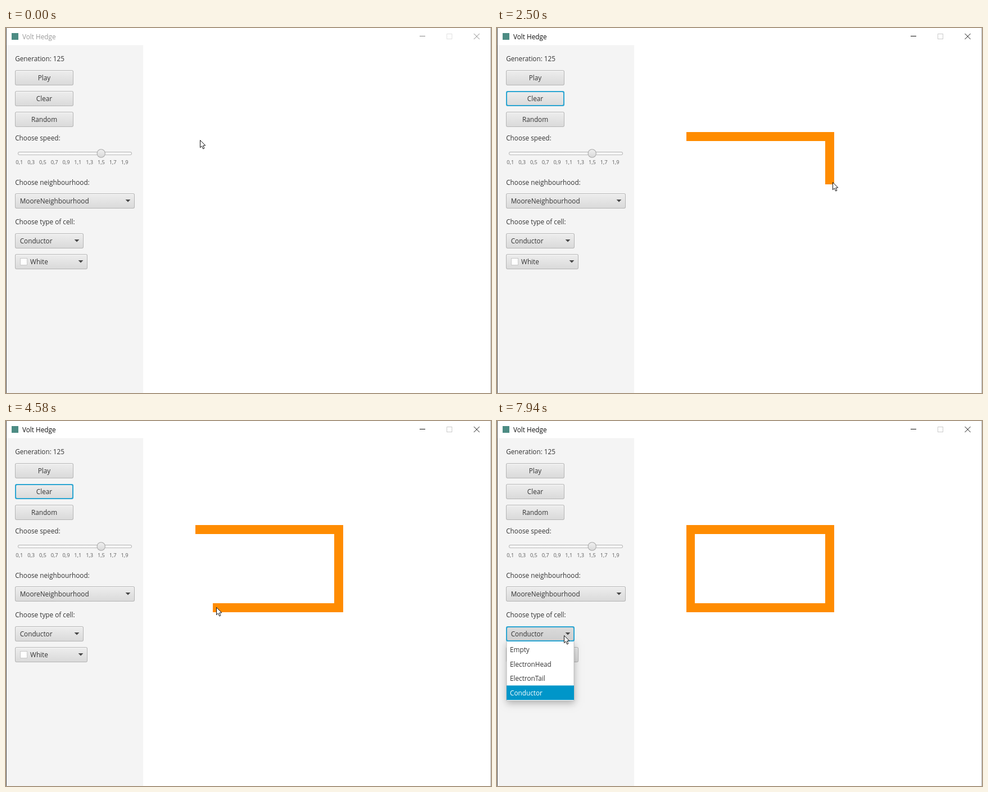
An HTML page with a canvas for the animation above (8 s loop, 863 by 649 pixels).

```html
<!DOCTYPE html>
<html lang="en">
<head>
<meta charset="utf-8">
<title>Volt Hedge</title>
<style>
html, body { margin: 0; width: 100%; height: 100%; overflow: hidden; background: #fff; }
canvas { display: block; }
</style>
</head>
<body>
<canvas id="stage" width="863" height="649"></canvas>
<script>
const ctx = document.getElementById('stage').getContext('2d');
const LOOP = 8000;
const ACTIVE = 390, PRESS = 550, RELEASE = 6500, OPEN = 7730;
const TICK = 55, PHASE = 25;      // screen refresh
const PAINT_LAG = 30;
const CELL = 15.47, GRID_X = 244, GRID_Y = 30.5;
const BOX_H = 27;

// Pointer strokes, each eased from where the last one ended
const home = { x: 345, y: 199 };
const strokes = [
  { from: 390, to: 2050, x: 594, y: 196 },
  { from: 2050, to: 2850, x: 599, y: 328 },
  { from: 3320, to: 4880, x: 342, y: 332 },
  { from: 5280, to: 6480, x: 345, y: 202 },
  { from: 6780, to: 7260, x: 121, y: 367 },
  { from: 7840, to: 7885, x: 119, y: 381 }
];

const ease = u => u * u * (3 - 2 * u);

function pointerAt(t) {
  let { x, y } = home;
  for (const s of strokes) {
    if (t <= s.from) break;
    const k = ease(Math.min(1, (t - s.from) / (s.to - s.from)));
    x += (s.x - x) * k;
    y += (s.y - y) * k;
  }
  return { x, y };
}

function rect(x, y, w, h, fill) {
  ctx.fillStyle = fill;
  ctx.fillRect(x, y, w, h);
}

function outline(x, y, w, h, color) {
  ctx.strokeStyle = color;
  ctx.lineWidth = 1;
  ctx.strokeRect(x + 0.5, y + 0.5, w - 1, h - 1);
}

function line(color, x0, y0, x1, y1) {
  ctx.strokeStyle = color;
  ctx.lineWidth = 1;
  ctx.beginPath();
  ctx.moveTo(x0, y0);
  ctx.lineTo(x1, y1);
  ctx.stroke();
}

function polygon(points, fill, stroke) {
  ctx.beginPath();
  points.forEach(([x, y]) => ctx.lineTo(x, y));
  ctx.closePath();
  ctx.fillStyle = fill;
  ctx.fill();
  if (!stroke) return;
  ctx.strokeStyle = stroke;
  ctx.lineWidth = 1;
  ctx.stroke();
}

function text(str, x, cy, { size = 11.75, color = '#333', align = 'left' } = {}) {
  ctx.font = size + 'px "Open Sans", "Noto Sans", sans-serif';
  ctx.fillStyle = color;
  ctx.textAlign = align;
  ctx.fillText(str, x, cy + size * 0.375);
}

function shade(y, h, from, to) {
  const g = ctx.createLinearGradient(0, y, 0, y + h);
  g.addColorStop(0, from);
  g.addColorStop(1, to);
  return g;
}

function round(x, y, w, h, r, fill) {
  ctx.beginPath();
  ctx.roundRect(x, y, w, h, r);
  ctx.fillStyle = fill;
  ctx.fill();
}

function box(x, y, w, focused, pressed) {
  const edge = focused ? 2 : 1;
  round(x, y, w, BOX_H, 3, focused ? '#2ba5d2' : '#b5b5b5');
  round(x + edge, y + edge, w - 2 * edge, BOX_H - 2 * edge, 2,
    pressed ? shade(y, BOX_H, '#dcdcdc', '#cdcdcd') : shade(y, BOX_H, '#eeeeee', '#d9d9d9'));
  if (!focused) line('#f8f8f8', x + 2, y + 1.5, x + w - 2, y + 1.5);
}

function button(label, y, focused) {
  box(16, y, 104, focused);
  text(label, 68, y + 13.3, { align: 'center' });
}

function combo(label, y, w, textX, focused) {
  box(16, y, w, focused, focused);
  text(label, textX, y + 13.3);
  const ax = 4 + w, ay = y + 11;
  polygon([[ax - 4.4, ay], [ax + 4.4, ay], [ax, ay + 4.5]], '#484848');
}

function titleBar(active) {
  rect(10, 9, 12, 12, '#4d8c84');
  text('Volt Hedge', 29, 15.3, { color: active ? '#111' : '#999' });
  const ink = active ? '#111' : '#888';
  rect(736, 14, 10, 1, ink);
  outline(784, 10, 10, 10, active ? '#ccc' : '#e2e2e2');
  line(ink, 832.5, 10, 842.5, 20);
  line(ink, 842.5, 10, 832.5, 20);
}

function slider() {
  round(21, 220, 203, 6, 3, '#b8b8b8');
  round(22, 221, 201, 4, 2, shade(221, 4, '#f0f0f0', '#ffffff'));
  round(161.5, 215.3, 15.4, 15.4, 7.7, '#a6a6a6');
  round(162.5, 216.3, 13.4, 13.4, 6.7, shade(216, 14, '#f0f0f0', '#d9d9d9'));
  for (let i = 0; i < 10; i++) {
    const value = (0.1 + i * 0.2).toFixed(1).replace('.', ',');
    text(value, 23.8 + i * 20.8, 238.7, { size: 9.3, color: '#5a5a5a', align: 'center' });
  }
}

function popup() {
  ctx.save();
  ctx.shadowColor = 'rgba(0,0,0,0.28)';
  ctx.shadowBlur = 12;
  ctx.shadowOffsetY = 4;
  rect(16.5, 391.5, 121, 106, '#bcbcbc');
  ctx.restore();
  rect(17.5, 392, 119, 105, '#fff');
  rect(17, 470.3, 120, 25.7, '#0096c9');
  ['Empty', 'ElectronHead', 'ElectronTail', 'Conductor'].forEach((name, i) =>
    text(name, 23, 406.6 + i * 25.7, { color: i === 3 ? '#fff' : '#333' }));
}

function panel(t) {
  const open = t >= OPEN;
  rect(1, 30.5, 243, 619, '#f4f4f4');
  text('Generation: 125', 16.2, 55);
  button('Play', 75);
  button('Clear', 112, t >= ACTIVE && !open);
  button('Random', 149);
  text('Choose speed:', 16.2, 195.5);
  slider();
  text('Choose neighbourhood:', 16.2, 274.4);
  combo('MooreNeighbourhood', 294, 213, 24.7);
  text('Choose type of cell:', 16.2, 345);
  combo('White', 402, 129, 43);
  rect(25, 409, 13, 13, '#fff');
  outline(25, 409, 13, 13, '#c8c8c8');
  if (open) popup();
  combo('Conductor', 365, 122, 24.7, open);
}

// Colours every cell the pressed pointer has crossed so far.
function wire(t) {
  if (t < PRESS) return;
  const last = Math.max(PRESS, Math.min(t - PAINT_LAG, RELEASE));
  const edge = (origin, n) => Math.round(origin + n * CELL);
  for (let s = PRESS; s <= last; s += 10) {
    const p = pointerAt(s);
    const col = Math.floor((p.x - GRID_X) / CELL);
    const row = Math.floor((p.y - GRID_Y) / CELL);
    const x = edge(GRID_X, col), y = edge(GRID_Y, row);
    rect(x, y, edge(GRID_X, col + 1) - x, edge(GRID_Y, row + 1) - y, '#ff8c00');
  }
}

function pointer({ x, y }) {
  ctx.save();
  ctx.translate(Math.round(x) + 0.5, Math.round(y) + 0.5);
  polygon([[0, 0], [0, 13.2], [3, 10.4], [5.2, 15.4], [7.4, 14.4], [5.3, 9.6], [9.3, 9.4]],
    '#fff', '#111');
  ctx.restore();
}

function draw(t) {
  const shown = t < PRESS ? 0 : t - (t - PHASE) % TICK;
  rect(0, 0, 863, 649, '#fff');
  titleBar(t >= ACTIVE);
  panel(t);
  wire(shown);
  rect(0, 0, 1, 649, '#505050');
  rect(862, 0, 1, 649, '#b4b4b4');
  pointer(pointerAt(shown));
}

function tick() {
  draw(performance.now() % LOOP);
  requestAnimationFrame(tick);
}
tick();
</script>
</body>
</html>
```
